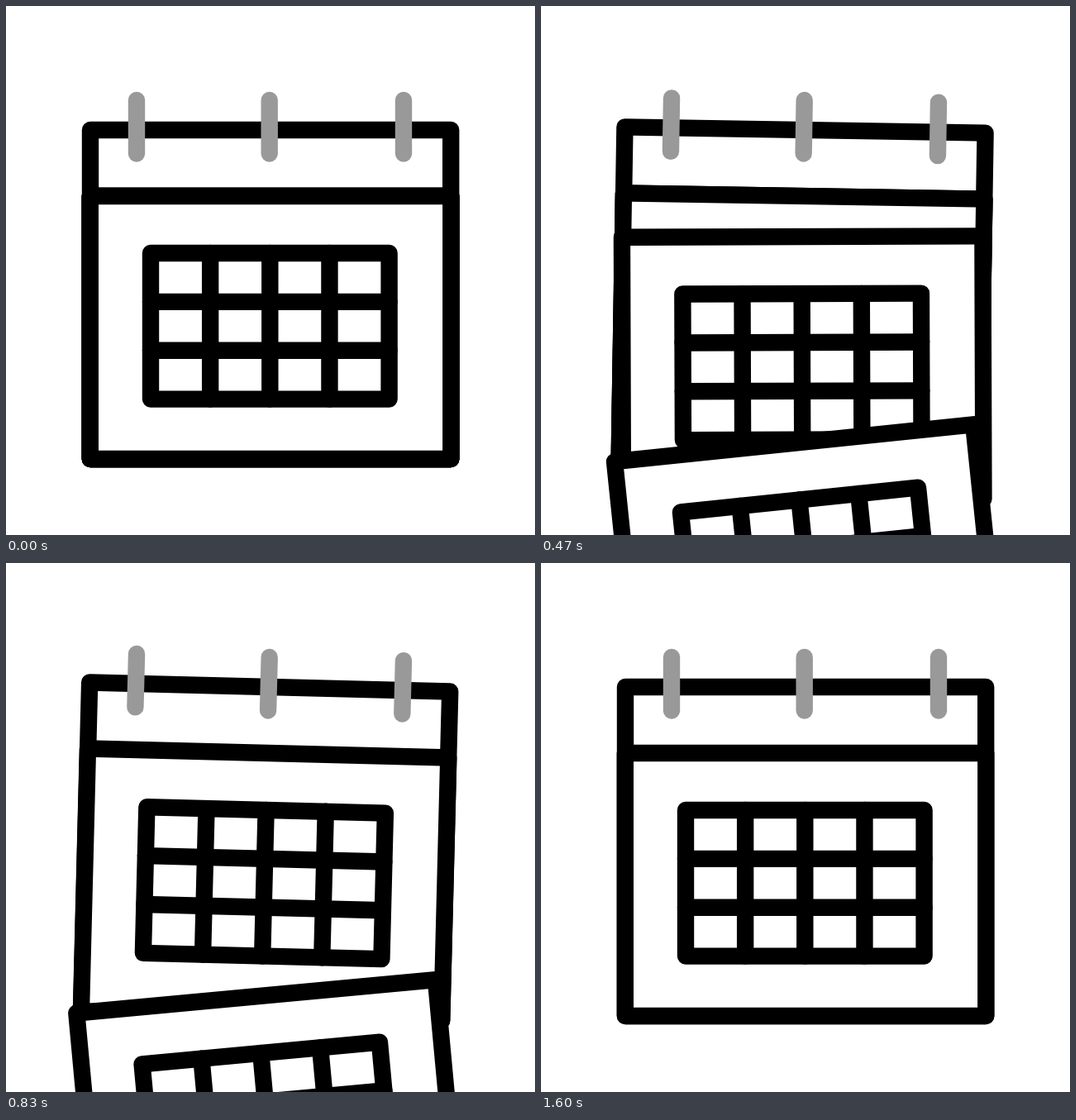
These frames come from a looping animation (640 px wide and 640 px high, 1.67 s). An HTML page with a canvas:

```html
<!DOCTYPE html>
<html lang="en">
<head>
<meta charset="utf-8">
<title>Calendar</title>
<style>
  html, body { margin: 0; width: 100%; height: 100%; overflow: hidden; background: #fff; }
  canvas { display: block; width: 640px; height: 640px; }
</style>
</head>
<body>
<canvas id="stage" width="640" height="640"></canvas>
<script>
const ctx = document.getElementById('stage').getContext('2d');
const LOOP = 1670, TICK = 33.4, RAD = Math.PI / 180;
const BLACK = '#000', GRAY = '#999';
const PIVOT = { x: 318.7, y: 114 };

// Swing keys: [tick, degrees]
const SWING = [[1.85, 0], [9.66, 10], [18.3, -8], [28.7, 5.3], [34, 0]];

// Falling sheets, top one first: fall = pull * u^2 - drag * u^3
const SHEETS = [
  { start: 4.2, pull: 4.48, drag: 0.14 },
  { start: 10.15, pull: 3.62, drag: 0.08 },
  { start: 15.3, pull: 3.32, drag: 0.02 }
];

const clamp = v => Math.min(1, Math.max(0, v));
const smooth = v => v * v * (3 - 2 * v);

function swingAt(tick) {
  for (let i = 1; i < SWING.length; i++) {
    const [t0, a0] = SWING[i - 1], [t1, a1] = SWING[i];
    if (tick < t1) return a0 + (a1 - a0) * smooth(clamp((tick - t0) / (t1 - t0)));
  }
  return 0;
}

function rotateAbout(x, y, degrees) {
  ctx.translate(x, y);
  ctx.rotate(degrees * RAD);
  ctx.translate(-x, -y);
}

function line(x0, y0, x1, y1) {
  ctx.beginPath();
  ctx.moveTo(x0, y0);
  ctx.lineTo(x1, y1);
  ctx.stroke();
}

function box(x, y, w, h) {
  ctx.fillRect(x, y, w, h);
  ctx.strokeRect(x, y, w, h);
}

function drawSheet() {
  box(101.8, 230, 436.5, 318);
  const x = 175, y = 299, w = 288.6, h = 176.6;
  box(x, y, w, h);
  for (let i = 1; i < 4; i++) line(x + w * i / 4, y, x + w * i / 4, y + h);
  for (let i = 1; i < 3; i++) line(x, y + h * i / 3, x + w, y + h * i / 3);
}

function drawFallingSheet({ start, pull, drag }, tick) {
  const u = Math.max(0, tick - start);
  const fall = u * u * (pull - drag * u);
  if (u > 18 || fall > 600) return;
  ctx.save();
  ctx.translate(0, fall);
  rotateAbout(320, 290, -fall / 43.6);
  drawSheet();
  ctx.restore();
}

function drawMark(tick) {
  const drawn = smooth(clamp((tick - 27) / 10.1));
  const alpha = 1 - clamp((tick - 37) / 11);
  if (drawn <= 0 || alpha <= 0) return;
  const from = -30.2 * RAD;
  ctx.globalAlpha = alpha;
  ctx.beginPath();
  ctx.arc(206.2, 325.8, 64.5, from, from + drawn * 2 * Math.PI);
  ctx.stroke();
  ctx.globalAlpha = 1;
}

function draw(tick) {
  ctx.fillStyle = '#fff';
  ctx.fillRect(0, 0, 640, 640);
  ctx.lineWidth = 20.4;
  ctx.lineCap = ctx.lineJoin = 'round';

  ctx.save();
  rotateAbout(PIVOT.x, PIVOT.y, swingAt(tick));

  ctx.strokeStyle = BLACK;
  box(102, 150, 436.2, 398);
  drawSheet();
  for (const sheet of [...SHEETS].reverse()) drawFallingSheet(sheet, tick);

  ctx.strokeStyle = GRAY;
  for (const x of [158, 318.7, 481]) line(x, 114, x, 178.5);
  drawMark(tick);
  ctx.restore();
}

function frame() {
  const time = performance.now() % LOOP;
  draw(Math.floor(time / TICK + 0.2));
  requestAnimationFrame(frame);
}
frame();
</script>
</body>
</html>
```
